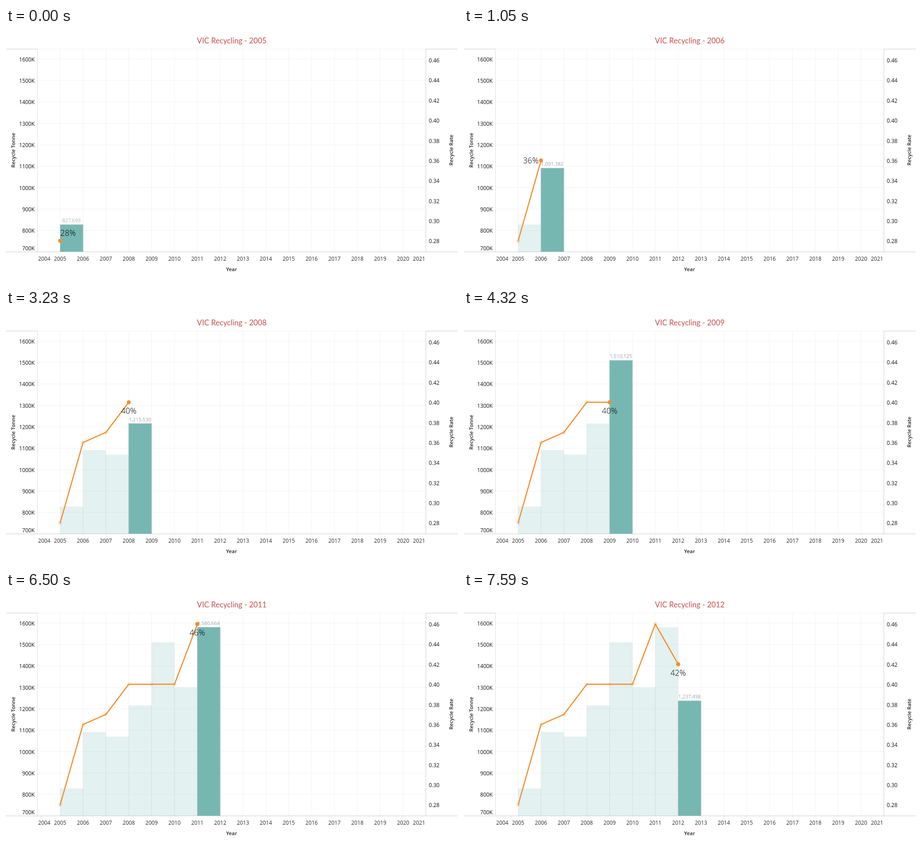
An HTML page for the animation above (8000 ms loop, 998x561 px).

```html
<!DOCTYPE html>
<html lang="en">
<head>
<meta charset="utf-8">
<title>VIC Recycling</title>
<style>
  html, body { margin: 0; width: 100%; height: 100%; overflow: hidden; background: #fff; }
  svg { display: block; width: 998px; height: 561px; }
  text { font-family: "Open Sans", "Noto Sans", sans-serif; }
  .title { font: 16.7px Lato, sans-serif; fill: #c8504f; text-anchor: middle; }
  .tick { font-size: 11.8px; font-weight: 500; fill: #111; }
  .year { fill: #2b2b2b; text-anchor: middle; }
  .name { font-size: 11.3px; font-weight: 600; fill: #222; text-anchor: middle; }
  .value { font-size: 11.2px; font-weight: 300; fill: #66727a; text-anchor: middle; }
  .rate { font-size: 17.5px; font-weight: 300; fill: #000; text-anchor: middle; }
  .grid { stroke: #f2f2f2; }
  .axis { stroke: #ccc; }
  .bar { fill: #76b7b2; }
  .past { opacity: .2; }
  .line { fill: none; stroke: #f28e2b; stroke-width: 2.5; stroke-linejoin: round; stroke-linecap: round; }
  .dot { fill: #f28e2b; }
</style>
</head>
<body>
<svg viewBox="0 0 998 561"><g id="frame"></g><g id="plot"></g></svg>
<script>
const LOOP = 8000, FIRST = 1050, STEP = 1090;
const TOP = 46.5, BASE = 494.5, LEFT = 69.5, RIGHT = 927;
const tonnes = [827693, 1091382, 1069807, 1215530, 1510125, 1299382, 1580664, 1237498];
const rates = [28, 36, 37, 40, 40, 40, 46, 42];

// Percentage label offsets that differ from the usual "below the point"
const rateOffset = { 0: [17.5, -17], 1: [-22.5, 0] };
const uprightValue = 2;

const xOf = year => 119.6 + (year - 2005) * 50.47;
const yOf = thousands => BASE - (thousands - 700) * 0.4733;
const rateY = percent => 470 - (percent - 28) * 22.18;

const frame = document.getElementById('frame');
const plot = document.getElementById('plot');

function add(parent, tag, attrs, text) {
  const node = document.createElementNS('http://www.w3.org/2000/svg', tag);
  for (const key in attrs) node.setAttribute(key, attrs[key]);
  if (text !== undefined) node.textContent = text;
  return parent.appendChild(node);
}
const rule = (cls, x1, y1, x2, y2) => add(frame, 'line', { class: cls, x1, y1, x2, y2 });
const label = (parent, cls, x, y, text, extra) =>
  add(parent, 'text', { class: cls, x, y, ...extra }, text);
const turned = (x, y) => ({ transform: `rotate(-90 ${x} ${y})` });

function drawFrame() {
  for (let year = 2005; year <= 2020; year++) {
    rule('grid', xOf(year), TOP, xOf(year), BASE + 4);
    label(frame, 'tick year', xOf(year), 514, year);
  }
  label(frame, 'tick year', 84.5, 514, 2004);
  label(frame, 'tick year', 912, 514, 2021);

  for (let k = 800; k <= 1600; k += 100) {
    rule('grid', LEFT, yOf(k), RIGHT, yOf(k));
    label(frame, 'tick', 63.3, yOf(k) + 5.3, k + 'K', { 'text-anchor': 'end' });
  }
  label(frame, 'tick', 63.3, 491, '700K', { 'text-anchor': 'end' });

  for (let p = 28; p <= 46; p += 2)
    label(frame, 'tick', 933.5, rateY(p) + 5.3, (p / 100).toFixed(2));

  rule('grid', LEFT, TOP, RIGHT, TOP);
  rule('axis', 0, TOP, LEFT, TOP);
  rule('axis', RIGHT, TOP, 997, TOP);
  rule('axis', LEFT, TOP, LEFT, BASE).style.stroke = '#ddd';
  rule('axis', RIGHT, TOP, RIGHT, BASE);
  rule('axis', 0, BASE, 997, BASE);

  label(frame, 'name', 498, 536.5, 'Year');
  label(frame, 'name', 19.5, 270, 'Recycle Tonne', turned(19.5, 270));
  label(frame, 'name', 986.5, 269.5, 'Recycle Rate', turned(986.5, 269.5));
}

function drawYear(current) {
  plot.replaceChildren();
  label(plot, 'title', 498.5, 33.5, `VIC Recycling - ${2005 + current}`);

  const points = [];
  for (let i = 0; i <= current; i++) {
    const x = xOf(2005 + i), y = yOf(tonnes[i] / 1000), past = i < current;
    add(plot, 'rect', {
      class: past ? 'bar past' : 'bar', x: x - .3, y, width: 51, height: BASE - y,
      ...(past ? {} : { stroke: '#ccd2d1', 'stroke-width': 1 })
    });
    points.push([x, rateY(rates[i])]);
  }

  for (const [cx, cy] of points.slice(0, -1))
    add(plot, 'circle', { class: 'dot past', cx, cy, r: 4.5 });
  if (current) add(plot, 'polyline', { class: 'line', points: points.join(' ') });
  const [cx, cy] = points[current];
  add(plot, 'circle', { class: 'dot', cx, cy, r: 4.5 });

  const mid = cx + 25, top = yOf(tonnes[current] / 1000);
  const amount = tonnes[current].toLocaleString('en-US');
  if (current === uprightValue)
    label(plot, 'value', mid + 4.5, top - 28, amount, turned(mid + 4.5, top - 28));
  else
    label(plot, 'value', mid, top - 4.8, amount, current ? {} : { style: 'fill:#858585' });

  const [dx, dy] = rateOffset[current] || [0, 19];
  label(plot, 'rate', cx + dx, cy + dy + 6.3, rates[current] + '%');
}

let shown = -1;
function tick(now) {
  const t = now % LOOP;
  const current = t < FIRST ? 0 : 1 + Math.floor((t - FIRST) / STEP);
  if (current !== shown) drawYear(shown = current);
  requestAnimationFrame(tick);
}

drawFrame();
tick(performance.now());
</script>
</body>
</html>
```
